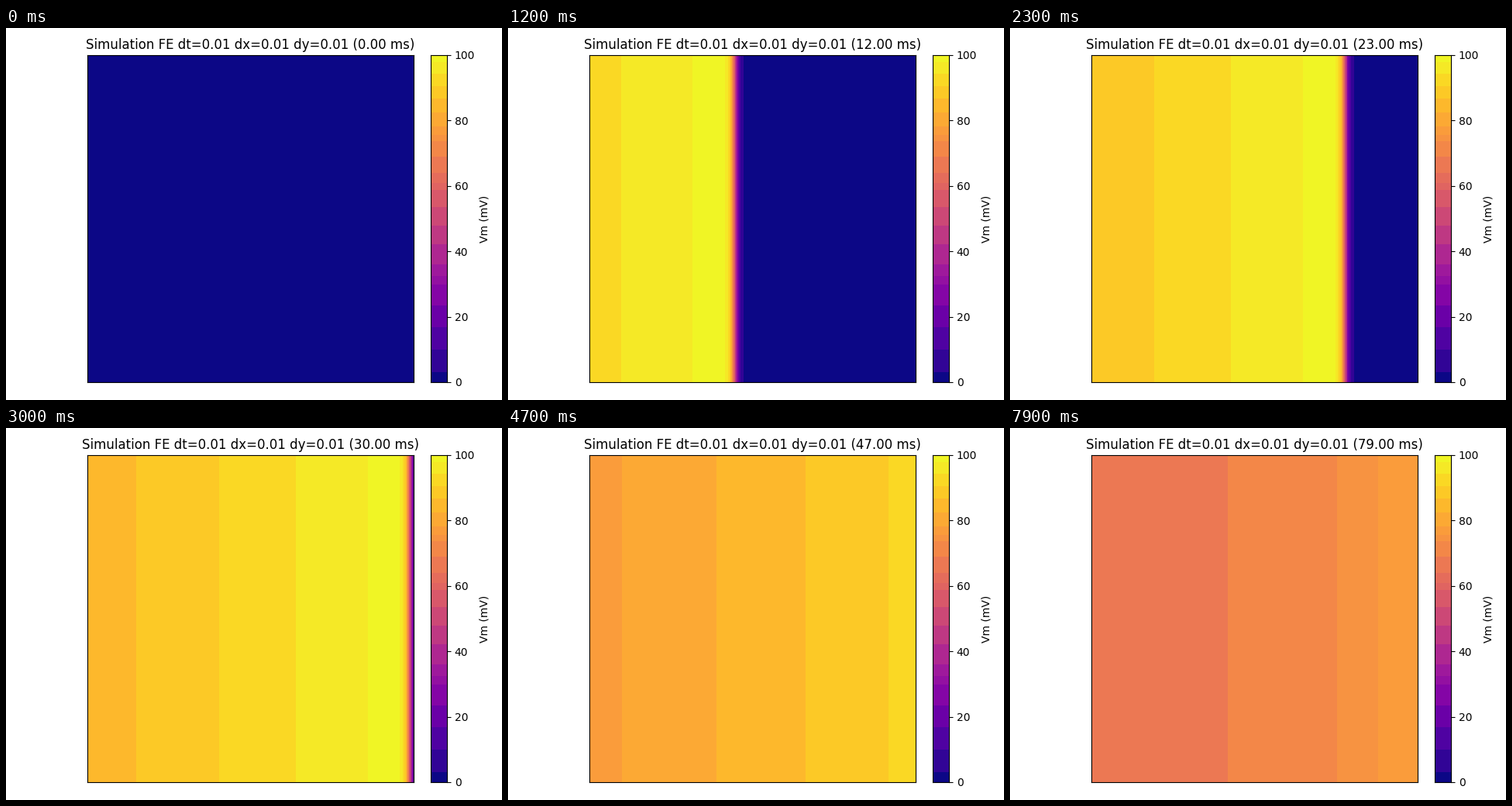
These frames come from a looping animation (640 px wide and 480 px high, 8000 ms). A matplotlib script:

```python
import numpy as np
import matplotlib.pyplot as plt
from matplotlib.animation import FuncAnimation

W, H, DPI = 640, 480, 100
FRAMES, STEP_MS = 80, 100
LEFT, RIGHT, TOP, BOTTOM = 105, 526, 35, 457

SPEED = 12.7     # wave speed, px per simulated ms
START = 140.6    # extrapolated front position at t = 0, px
ONSET = 0.33     # activation time of the stimulated strip, ms
STEEP = 3.2      # width of the upstroke, px

# Colour bands widen steadily from yellow to blue; three are split in two
k = np.arange(19)
limits = np.sort(np.append(97.9 - 3.39 * k - 0.105 * k**2, [75.6, 61, 32.5]))
edges = np.concatenate([[0], limits, [100]])
shades = (edges[:-1] + edges[1:]) / 200
shades[0] = 0
BANDS = plt.get_cmap("plasma")(shades)[:, :3]


def colour(v):
    return BANDS[np.searchsorted(limits, v, side="right")]


def potential(x, t):
    """Travelling wave: sharp upstroke, then a slow recovery behind it."""
    if t == 0:
        return np.zeros_like(x)
    active = np.maximum((x - START) / SPEED, ONSET)
    lag = SPEED * (t - active)
    rise = 1 / (1 + np.exp(-np.clip(lag / STEEP, -50, 50)))
    return (100 - 0.0384 * lag + 2.9e-6 * lag**2) * rise


def add_axes(left, right):
    return fig.add_axes([left / W, 1 - BOTTOM / H,
                         (right - left) / W, (BOTTOM - TOP) / H])


def show(ax, pixels, top):
    return ax.imshow(pixels, extent=(0, 1, 0, top), aspect="auto",
                     interpolation="nearest")


fig = plt.figure(figsize=(W / DPI, H / DPI), dpi=DPI, facecolor="white")

ax = add_axes(LEFT, RIGHT)
ax.set(xticks=[], yticks=[])
xs = np.arange(LEFT, RIGHT) + 0.5
field = show(ax, colour(potential(xs, 0))[None], 1)
title = ax.set_title("", fontsize=12)

bar = add_axes(548, 569)
show(bar, colour(np.linspace(100, 0, BOTTOM - TOP))[:, None], 100)
bar.yaxis.tick_right()
bar.yaxis.set_label_position("right")
bar.set(xticks=[], yticks=range(0, 101, 20))
bar.set_ylabel("Vm (mV)")


def update(t):
    field.set_data(colour(potential(xs, t))[None])
    title.set_text(f"Simulation FE dt=0.01 dx=0.01 dy=0.01 ({t:.2f} ms)")
    return field, title


anim = FuncAnimation(fig, update, frames=FRAMES, interval=STEP_MS,
                     repeat=True, repeat_delay=0, blit=False)
plt.show()
```
